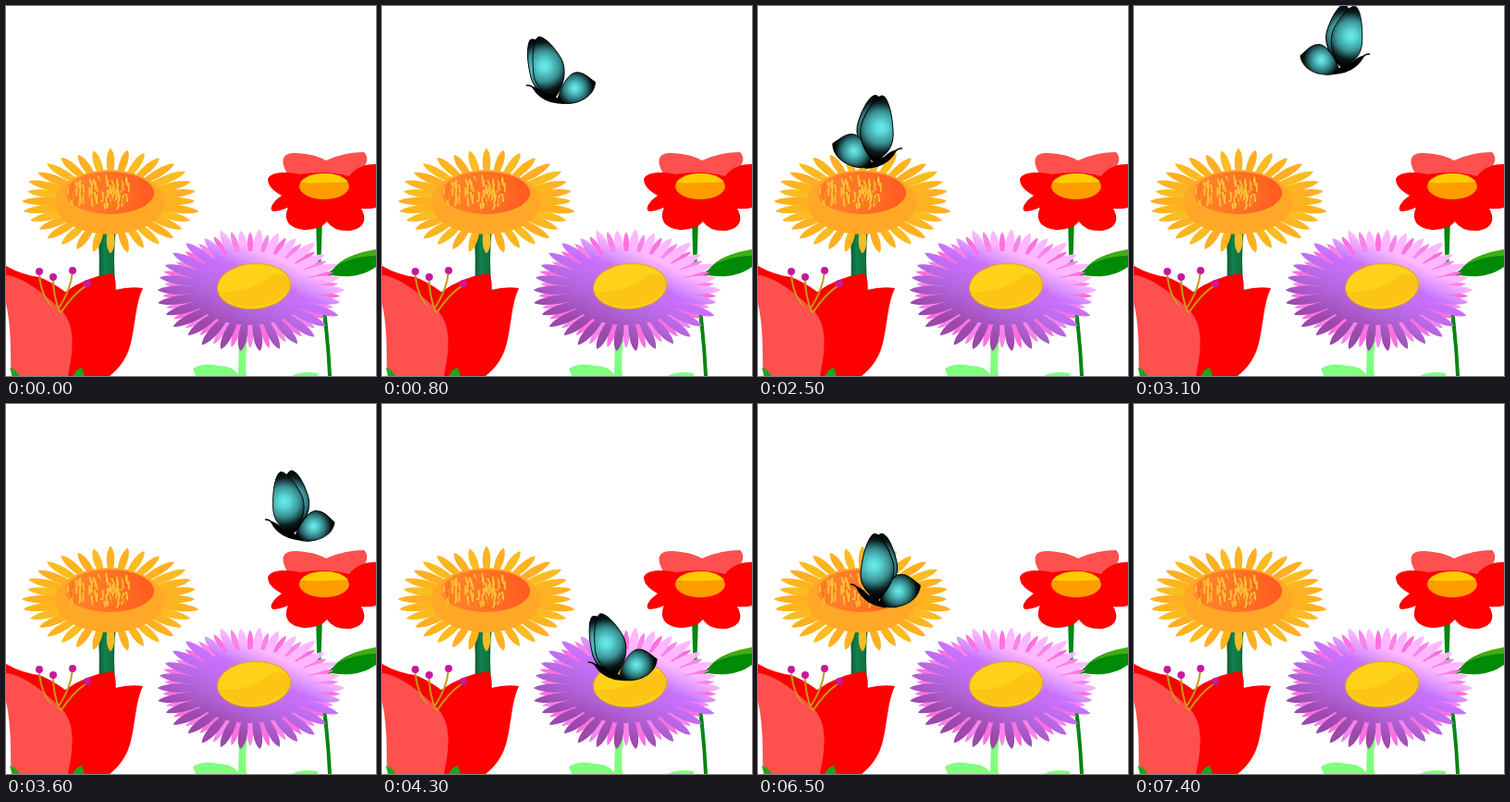
These frames come from a looping animation (400x400 px, 7700 ms). An HTML page:

```html
<!DOCTYPE html>
<html lang="en">
<head>
<meta charset="utf-8">
<title>Butterfly among flowers</title>
<style>
html, body { margin: 0; width: 100%; height: 100%; overflow: hidden; background: #fff; }
svg { display: block; width: 100vw; height: 100vh; }
</style>
</head>
<body>
<svg viewBox="0 0 400 400">
  <defs>
    <linearGradient id="violet" gradientUnits="userSpaceOnUse" x1="290" y1="245" x2="241" y2="354">
      <stop offset=".2" stop-color="#ffb8ff"/><stop offset=".36" stop-color="#d48cff"/>
      <stop offset=".42" stop-color="#c972ff"/><stop offset=".58" stop-color="#c06cf0"/>
      <stop offset=".74" stop-color="#b264da"/><stop offset="1" stop-color="#9c48ac"/>
    </linearGradient>
    <linearGradient id="disc"><stop offset="0" stop-color="#ff8a2c"/><stop offset="1" stop-color="#ff5a20"/></linearGradient>
    <linearGradient id="stalk"><stop offset="0" stop-color="#06532f"/><stop offset=".4" stop-color="#12824c"/><stop offset="1" stop-color="#0a683c"/></linearGradient>
    <radialGradient id="foreGlow" gradientUnits="userSpaceOnUse" cx="22" cy="-24" r="35">
      <stop offset="0" stop-color="#6ceeec"/><stop offset=".2" stop-color="#58d4d3"/>
      <stop offset=".5" stop-color="#3a9194"/><stop offset=".78" stop-color="#0a1a1c"/><stop offset="1"/>
    </radialGradient>
    <radialGradient id="hindGlow" gradientUnits="userSpaceOnUse" cx="53" cy="1" r="22">
      <stop offset="0" stop-color="#6ceeec"/><stop offset=".25" stop-color="#55c8c8"/>
      <stop offset=".6" stop-color="#2d777a"/><stop offset=".9" stop-color="#081414"/><stop offset="1"/>
    </radialGradient>
    <path id="foreWing" d="M31 13C15 5 8-4 9-22C9-42 14-58 19-58C26-57 35-45 41-33C48-20 44-1 31 13Z"/>
    <path id="hindWing" d="M34 16C36 3 44-16 54-17C62-18 68-12 76-7C76 5 67 13 56 17C47 20 39 20 34 16Z"/>
  </defs>

  <!-- yellow flower -->
  <path fill="url(#stalk)" d="M99 236L119 240Q115 272 119 310H100Q102 270 99 236Z"/>
  <g id="sun"></g>
  <ellipse cx="112" cy="212" rx="59" ry="35" fill="#ffa827"/>
  <ellipse cx="112" cy="202" rx="48" ry="23" fill="url(#disc)"/>
  <g id="seeds" stroke-width="1.8" stroke-linecap="round"></g>

  <!-- red flower, right -->
  <path fill="#008510" d="M335 230H342Q341 262 340 288Q349 340 352 400H348Q346 350 337 300Z"/>
  <path fill="#008a08" d="M340 288Q348 290 354 284C364 272 378 267 400 264V282C386 292 370 294 352 291L340 295Z"/>
  <path fill="#3fae10" d="M358 280Q374 267 400 263V270Q378 270 358 280Z"/>
  <path fill="#ff5050" d="M304 181C295 165 300 158 315 159Q334 160 346 167Q366 158 387 158C395 166 388 177 372 187H330Z"/>
  <path fill="red" d="M318 182C300 178 284 180 283 188C284 197 292 201 298 205C286 213 284 222 290 222Q298 221 305 218C298 233 309 242 325 242Q341 241 347 233Q354 244 372 243C389 240 390 229 384 219Q394 220 400 218V171C388 170 376 176 371 184Q345 177 318 182Z"/>
  <ellipse cx="344" cy="195" rx="27" ry="14" fill="#ff9c00"/>
  <path fill="#ffcb00" d="M318 191Q326 181 344 181T370 190Q344 192 318 191Z"/>

  <!-- violet flower -->
  <path fill="#80ff80" d="M252 360H261Q258 382 260 400H251ZM202 392Q214 385 230 389Q246 389 252 400H205ZM309 400Q320 394 337 397V400Z"/>
  <g id="aster"></g>
  <ellipse cx="264" cy="305" rx="66" ry="40" fill="url(#violet)"/>
  <ellipse cx="268" cy="303" rx="39.5" ry="24.5" transform="rotate(-4 268 303)" fill="#ffd21a" stroke="#dca806" stroke-width="1.5" stroke-dasharray="2 1"/>
  <path fill="#fcc414" d="M230 309Q262 310 280 296T307 298Q306 315 281 323Q244 331 230 309Z"/>

  <!-- tulip -->
  <path fill="red" d="M0 281Q18 291 36 293Q51 299 64 309Q86 293 115 289Q120 296 118 307Q133 303 148 305C140 322 140 344 135 364Q130 386 112 400H64L0 310Z"/>
  <path fill="#ff5050" d="M0 291C16 292 39 309 56 325C75 342 74 366 67 400H6C4 382 7 353 0 322Z"/>
  <path fill="none" stroke="#c99a18" stroke-width="2" d="M36 290Q38 313 49 324M51 295Q51 313 58 331M72 287Q70 308 56 328M87 302Q72 312 59 332"/>
  <path fill="#c8189c" d="M32 287a4 4 0 1 0 8 0a4 4 0 1 0-8 0M47 293a4 4 0 1 0 8 0a4 4 0 1 0-8 0M68 286a4 4 0 1 0 8 0a4 4 0 1 0-8 0M84 300a4 4 0 1 0 8 0a4 4 0 1 0-8 0"/>
  <path fill="#18a818" d="M4 391Q11 393 15 400H7ZM72 400Q76 392 82 391L85 400Z"/>

  <g id="butterfly">
    <use id="farFore" href="#foreWing" fill="url(#foreGlow)" stroke="#000"/>
    <use id="hind" href="#hindWing" fill="url(#hindGlow)" stroke="#000"/>
    <use id="fore" href="#foreWing" fill="url(#foreGlow)" stroke="#000"/>
    <path d="M6 1Q13 2 20 8Q32 10 42 20Q25 20 16 13Q9 8 6 1Z"/>
    <path fill="none" stroke="#000" stroke-width="1.5" d="M9 4Q5-1 0 0"/>
  </g>
</svg>
<script>
const byId = id => document.getElementById(id);

let seed = 7;
const random = () => (seed = seed * 16807 % 2147483647) / 2147483647;

// Ring of petals whose tips lie on an ellipse
function ring(id, { n, cx, cy, rx, ry, width, fills, turn = 0 }) {
  let out = '';
  for (let i = 0; i < n; i++) {
    const angle = (i + turn) / n * 2 * Math.PI, reach = 0.94 + random() * 0.07;
    const dx = Math.cos(angle) * rx * reach, dy = Math.sin(angle) * ry * reach;
    const length = Math.hypot(dx, dy), nx = -dy / length * width, ny = dx / length * width;
    const at = (along, side) => `${(cx + dx * along + nx * side).toFixed(1)} ${(cy + dy * along + ny * side).toFixed(1)}`;
    out += `<path fill="${fills[i % fills.length]}" d="M${at(.4, 0)}C${at(.65, 1)} ${at(.92, .8)} ${at(1, 0)}C${at(.92, -.8)} ${at(.65, -1)} ${at(.4, 0)}Z"/>`;
  }
  byId(id).innerHTML += out;
}

ring('sun', { n: 32, cx: 113, cy: 211, rx: 97, ry: 57, width: 6.3, fills: ['#fdb51e', '#ffaf24', '#fbbc22'] });
const aster = { cx: 264, cy: 307, rx: 104, ry: 68, width: 7 };
ring('aster', { ...aster, n: 30, turn: .5, ry: 64, rx: 98, width: 5, fills: ['#ff70e0', '#f884ea'] });
ring('aster', { ...aster, n: 30, fills: ['url(#violet)'] });

let seeds = '';
for (let i = 0; i < 95; i++) {
  const x = 67 + random() * 66;
  const room = 19 * Math.sqrt(1 - ((x - 112) / 48) ** 2);
  const y = 202 + (random() * 2 - 1) * room, h = 4 + random() * 6;
  seeds += `<path stroke="${i % 3 ? '#ffc238' : '#f47a1c'}" d="M${x} ${y}l${random() * 3 - 1} ${y > 208 ? -h : h}"/>`;
}
byId('seeds').innerHTML = seeds;

// time, centre x, head y, tilt
const flight = [
  [0, 259, -45, 0], [100, 251, -10, 0], [800, 196, 86, 0], [1400, 139, 168, 0], [1600, 130, 183, 0],
  [2000, 130, 183, 0], [2100, 126, 180, 0], [2500, 116, 154, 3], [2800, 145, 77, 3],
  [3000, 185, 54, 3], [3200, 245, 50, 3], [3400, 293, 82, 3], [3600, 320, 125, 4],
  [4100, 254, 240, 0], [4400, 267, 299, 0], [5500, 267, 299, 0], [5800, 241, 275, 2],
  [6300, 175, 219, 6], [6500, 140, 195, 8], [7100, 13, 166, 4], [7400, -55, 163, 0]
];
// Wing angles over one five-step flap
const flap = {
  fore: [0, -5, -9, -5, 0],
  farFore: [6, 5, -2, -12, 6],
  hind: [-3, 5, 7, 3, -3]
};

function draw() {
  const t = Math.min(Math.floor(performance.now() % 7700 / 100) * 100, 7400);
  const next = Math.max(1, flight.findIndex(key => key[0] >= t));
  const a = flight[next - 1], b = flight[next];
  const k = (t - a[0]) / (b[0] - a[0]);
  const [, x, y, tilt] = a.map((v, i) => v + (b[i] - v) * k);
  const side = t >= 2100 && t <= 3200 ? -1 : 1;
  byId('butterfly').setAttribute('transform', `translate(${x - 40 * side} ${y}) scale(${side} 1) rotate(${tilt})`);

  const step = t / 100 % 5;
  const squeeze = 1 + flap.fore[step] / 90;
  for (const wing in flap) {
    byId(wing).setAttribute('transform', `translate(32 14) rotate(${flap[wing][step]}) scale(${squeeze}) translate(-32 -14)`);
  }
  requestAnimationFrame(draw);
}
draw();
</script>
</body>
</html>
```
